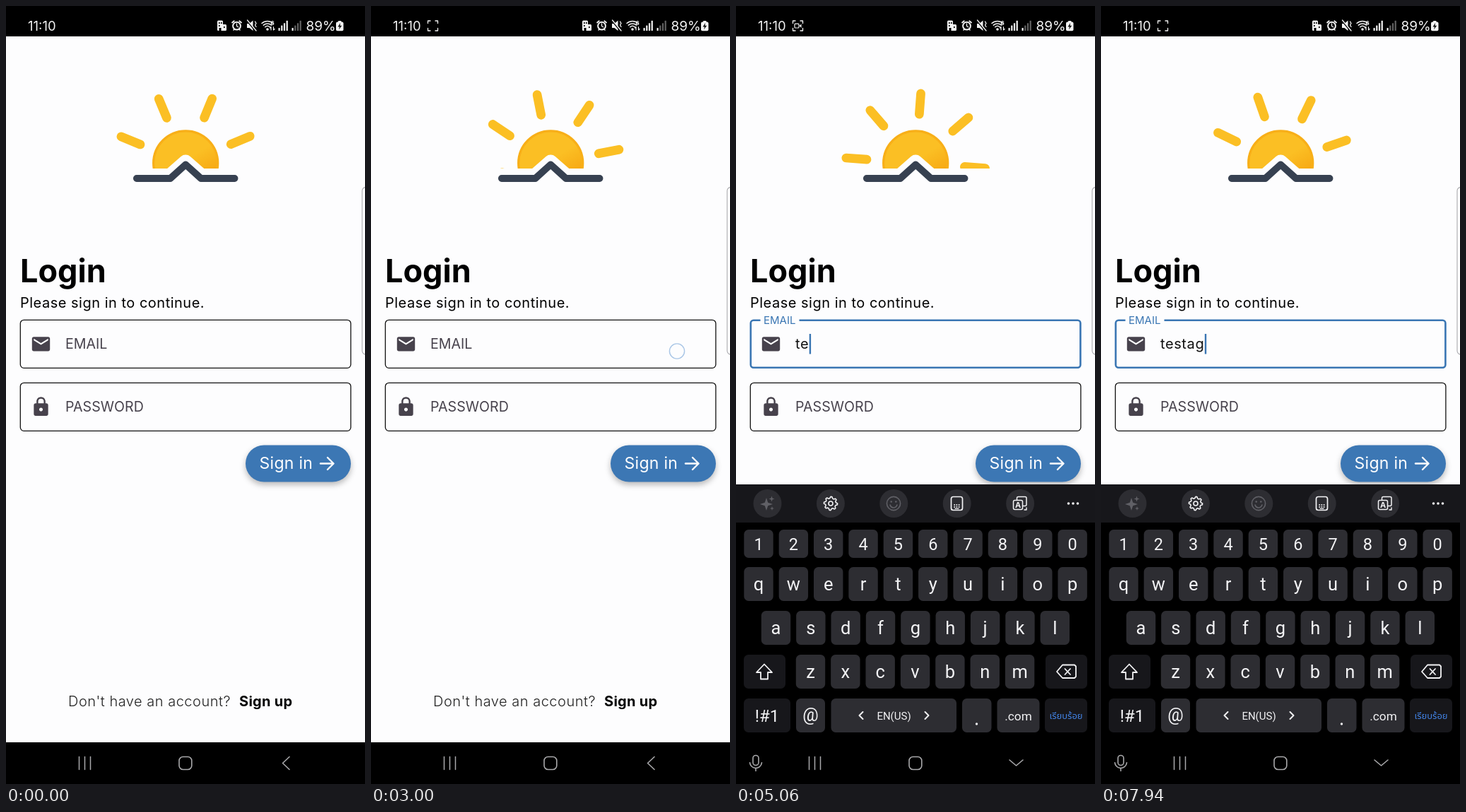
Recreate the animation shown at these times as an HTML page with a canvas. Size 508 by 1101 pixels, loop 8 s.

```html
<!DOCTYPE html>
<html lang="en">
<head>
<meta charset="utf-8">
<title>Login screen</title>
<style>
html, body { margin: 0; width: 100%; height: 100%; overflow: hidden; background: #000; }
canvas { display: block; width: 508px; height: 1101px; }
</style>
</head>
<body>
<canvas id="stage"></canvas>
<script>
const W = 508, H = 1101, LOOP = 8000, TAU = Math.PI * 2;
const canvas = document.getElementById('stage');
const c = canvas.getContext('2d');
const dpr = window.devicePixelRatio || 1;
canvas.width = W * dpr;
canvas.height = H * dpr;

const UI = 'Inter, "Open Sans", sans-serif';
const KEYS = 'Roboto, "Noto Sans", sans-serif';
const PAPER = '#fdfdfe', INK = '#47424c', BLUE = '#3a76b3', KEY = '#2d2d32', DARK = '#17171b';

const clamp = v => Math.max(0, Math.min(1, v));
const ramp = (t, start, length) => clamp((t - start) / length);
const easeOut = p => 1 - (1 - p) ** 3;

const PUSH = 290, POP = 2060, ZOOM = 300, FOCUS = 3180, KEYBOARD = 3310;
const typed = [[4350, 't'], [4900, 'e'], [5350, 's'], [5750, 't'], [7050, 'a'], [7600, 'g']];
const rows = [['1234567890', 32, 741, 40], ['qwertyuiop', 32, 794, 48],
              ['asdfghjkl', 56.5, 856, 48], ['zxcvbnm', 105.5, 918, 48]];
const STEP = 49.35;

const mail = new Path2D('M20 4H4c-1.1 0-2 .9-2 2v12c0 1.1.9 2 2 2h16c1.1 0 2-.9 2-2V6c0-1.1-.9-2-2-2zm0 4l-8 5-8-5V6l8 5 8-5v2z');
const lock = new Path2D('M18 8h-1V6c0-2.76-2.24-5-5-5S7 3.24 7 6v2H6c-1.1 0-2 .9-2 2v10c0 1.1.9 2 2 2h12c1.1 0 2-.9 2-2V10c0-1.1-.9-2-2-2zm-6 9c-1.1 0-2-.9-2-2s.9-2 2-2 2 .9 2 2-.9 2-2 2zm3.1-9H8.9V6a3.1 3.1 0 0 1 6.2 0z');
const person = new Path2D('M12 12a4 4 0 1 0 0-8 4 4 0 0 0 0 8zm0 2c-2.67 0-8 1.34-8 4v2h16v-2c0-2.66-5.33-4-8-4z');
const sunClip = new Path2D('M512 306H304l-35.9-31.4a18.4 18.4 0 0 0-24.3 0L208 306H0V0h512z');

function text(str, x, y, size, color, opt = {}) {
  c.font = `${opt.weight || 400} ${size}px ${opt.family || UI}`;
  c.letterSpacing = (opt.gap || 0) + 'px';
  c.textAlign = opt.align || 'left';
  c.fillStyle = color;
  c.fillText(str, x, y);
}

function fillBox(x, y, w, h, r, color) {
  c.beginPath();
  c.roundRect(x, y, w, h, r);
  c.fillStyle = color;
  c.fill();
}

function strokeBox(x, y, w, h, r, color, width) {
  c.beginPath();
  c.roundRect(x, y, w, h, r);
  c.strokeStyle = color;
  c.lineWidth = width;
  c.stroke();
}

function line(points, color, width, close) {
  c.beginPath();
  points.forEach(([x, y], i) => i ? c.lineTo(x, y) : c.moveTo(x, y));
  if (close) c.closePath();
  c.strokeStyle = color;
  c.lineWidth = width;
  c.lineCap = c.lineJoin = 'round';
  c.stroke();
}

function circle(x, y, r, fill, stroke, width) {
  c.beginPath();
  c.arc(x, y, r, 0, TAU);
  if (fill) { c.fillStyle = fill; c.fill(); }
  if (stroke) { c.strokeStyle = stroke; c.lineWidth = width; c.stroke(); }
}

function poly(points, color) {
  c.beginPath();
  points.forEach(([x, y]) => c.lineTo(x, y));
  c.fillStyle = color;
  c.fill();
}

function glyph(path, x, y) {
  c.save();
  c.translate(x, y);
  c.scale(1.27, 1.27);
  c.translate(-12, -12);
  c.fillStyle = INK;
  c.fill(path, 'evenodd');
  c.restore();
}

function gradient(x0, y0, x1, y1, from, to) {
  const g = c.createLinearGradient(x0, y0, x1, y1);
  g.addColorStop(0, from);
  g.addColorStop(0.45, from);
  g.addColorStop(1, to);
  return g;
}

function horizon(dy) {
  line([[128, 332], [216, 332], [256, 332 + dy], [296, 332], [384, 332]], '#374151', 18);
}

function iconSpace() {
  c.translate(254.2, 244);
  c.scale(0.542, 0.542);
  c.translate(-256, -332);
}

function sun(angle) {
  c.save();
  iconSpace();
  c.save();
  c.clip(sunClip);
  const fill = gradient(214, 219, 298, 365, '#fbbf24', '#f59e0b');
  circle(256, 292, 84, fill, '#f8af18', 6);
  c.restore();
  c.save();
  c.beginPath();
  c.rect(0, 0, 512, 306);
  c.clip();
  c.translate(256, 292);
  c.rotate(angle * TAU / 360);
  for (let i = 0; i < 8; i++) {
    line([[0, -128], [0, -182]], '#fbbf24', 23.5);
    c.rotate(TAU / 8);
  }
  c.restore();
  horizon(-36);
  c.restore();
}

function moon(angle) {
  c.save();
  c.beginPath();
  [[0, 0], [W, 0], [W, 230], [271.5, 230], [257, 243], [254.5, 244.5], [252, 243], [237, 230], [0, 230]]
    .forEach(([x, y]) => c.lineTo(x, y));
  c.clip();
  c.translate(255, 205.5);
  c.rotate(angle * TAU / 360);
  const R = 74, r = 72, ix = 45.5, iy = -74;
  const d = Math.hypot(ix, iy), dir = Math.atan2(iy, ix);
  const a = Math.acos((R * R - r * r + d * d) / (2 * R * d));
  const b = Math.acos((r * r - R * R + d * d) / (2 * r * d));
  c.beginPath();
  c.arc(0, 0, R, dir + a, dir - a + TAU);
  c.arc(ix, iy, r, dir + Math.PI + b, dir + Math.PI - b, true);
  c.closePath();
  c.fillStyle = gradient(-40, -50, 38, 70, '#86c3db', '#5eafcf');
  c.fill();
  c.strokeStyle = '#72b9d5';
  c.lineWidth = 3;
  c.lineJoin = 'round';
  c.stroke();
  c.restore();
  c.save();
  iconSpace();
  horizon(36);
  c.restore();
}

function field(y, icon, label, focus = 0) {
  if (focus) strokeBox(20.8, y + 0.8, 466.6, 67, 4, BLUE, 2.6);
  else strokeBox(20.3, y + 0.3, 467.6, 68, 5, '#111', 1.3);
  glyph(icon, 49.5, y + 34.3);
  if (focus) {
    c.fillStyle = PAPER;
    c.fillRect(62 - 27.5 * focus, y - 3, 55 * focus, 8);
  }
  text(label, 84 - 45 * focus, y + 41 - 35 * focus, 19.6 - 4.6 * focus, focus ? BLUE : INK,
       { gap: label === label.toUpperCase() ? 0 : 0.4 });
}

function button(x, y, label) {
  c.save();
  c.shadowColor = 'rgba(0,0,0,.28)';
  c.shadowBlur = 9 * dpr;
  c.shadowOffsetY = 4 * dpr;
  fillBox(x, y, 488 - x, 52, 26, '#3c77b4');
  c.restore();
  text(label, x + 19.5, y + 33.5, 23, '#fff', { gap: 0.3 });
  const m = y + 26;
  line([[445, m], [463, m]], '#fff', 2.4);
  line([[455, m - 8.5], [463.5, m], [455, m + 8.5]], '#fff', 2.4);
}

function footer(question, qx, action, ax) {
  text(question, qx, 991, 20, '#222', { weight: 300, gap: 0.5 });
  text(action, ax, 991, 20, '#000', { weight: 700, gap: 0.3 });
}

function title(str) {
  text(str, 20, 391, 45, '#000', { weight: 700 });
}

function login(t) {
  const angle = t < POP ? -22.7 + 7.5 * Math.min(t, PUSH + ZOOM) / 1000 : -33.7 + 7.5 * t / 1000;
  sun(angle);
  title('Login');
  text('Please sign in to continue.', 20, 427, 20, '#000', { gap: 0.5 });
  field(444, mail, 'EMAIL', easeOut(ramp(t, FOCUS, 167)));
  field(533, lock, 'PASSWORD');
  button(339, 621.5, 'Sign in');
  footer("Don't have an account?", 88, 'Sign up', 330);
  if (t < FOCUS) return;

  const done = typed.filter(k => k[0] <= t);
  const word = done.map(k => k[1]).join('');
  text(word, 84, 485, 20, '#111', { gap: 0.6 });
  const since = t - (done.length ? done[done.length - 1][0] : FOCUS);
  if (since % 1000 < 500) {
    c.fillStyle = BLUE;
    c.fillRect(84.5 + c.measureText(word).width, 464, 2.4, 28.5);
  }
}

function signup(t) {
  moon(6 * (t - 690) / 1000);
  title('Create Account');
  [[person, 'Full Name'], [mail, 'Email'], [lock, 'Password'], [lock, 'Confirm Password']]
    .forEach(([icon, label], i) => field(416 + 88.8 * i, icon, label));
  button(330, 771, 'Sign up');
  footer('Already have a accont?', 92, 'Sign in', 334);
}

function page(draw, t, alpha, scale) {
  c.save();
  c.beginPath();
  c.rect(0, 43, W, 999);
  c.clip();
  c.globalAlpha = alpha;
  c.translate(W / 2, 542);
  c.scale(scale, scale);
  c.translate(-W / 2, -542);
  c.fillStyle = PAPER;
  c.fillRect(0, 43, W, 999);
  draw(t);
  c.restore();
}

function statusBar(t, tint) {
  c.fillStyle = '#000';
  c.fillRect(0, 0, W, 43);
  c.globalAlpha = tint;
  c.fillStyle = '#abb9b5';
  c.fillRect(0, 19, W, 24);
  c.fillStyle = '#5d706b';
  c.fillRect(0, 0, W, 19);
  c.globalAlpha = 1;

  const w = '#f4f4f4', back = tint > 0.5 ? '#abb9b5' : '#000';
  text('11:10', 31, 35, 18.5, w);
  if (t >= 60) {
    for (const [sx, sy] of [[-1, -1], [1, -1], [1, 1], [-1, 1]]) {
      const x = 87.5 + 7 * sx, y = 28 + 7 * sy;
      line([[x - 3.5 * sx, y], [x, y], [x, y - 3.5 * sy]], w, 1.3);
    }
    const phase = t % 1000;
    if (phase >= 30 && phase < 500) {
      strokeBox(83, 25.2, 6, 5.8, 1, w, 1.2);
      poly([[89.5, 28], [92.5, 25.5], [92.5, 31]], w);
    }
  }
  // building
  fillBox(299, 20.5, 8, 14.5, 1.5, w);
  fillBox(304, 26, 8, 9, 1.5, w);
  for (const [x, y] of [[301, 23], [304, 23], [301, 27], [308, 29]]) {
    c.fillStyle = back;
    c.fillRect(x, y, 1.6, 2);
  }
  c.fillRect(301.5, 31, 3, 4);
  // alarm
  circle(326.5, 28.2, 5.4, null, w, 2);
  line([[326.5, 25], [326.5, 28.5], [328.6, 29.8]], w, 1.3);
  line([[320, 23.5], [322.7, 21.2]], w, 1.8);
  line([[333, 23.5], [330.3, 21.2]], w, 1.8);
  line([[322, 34], [323, 33]], w, 1.6);
  line([[331, 34], [330, 33]], w, 1.6);
  // mute
  poly([[341, 25], [344.5, 25], [349.5, 20.5], [349.5, 35], [344.5, 31], [341, 31]], w);
  line([[341, 20.5], [353, 35]], back, 2.4);
  line([[341.5, 20], [354, 35]], w, 1.3);
  line([[352.5, 22], [354, 24.5], [352.5, 27], [354, 29.5]], w, 1.3);
  // wifi
  for (const r of [5, 8.5, 12]) {
    c.beginPath();
    c.arc(370, 33.5, r, -2.3, -0.85);
    c.strokeStyle = w;
    c.lineWidth = 1.5;
    c.stroke();
  }
  circle(370, 33, 1.8, w);
  text('6', 374.5, 27, 8, w, { weight: 700 });
  line([[375, 34], [375, 29.5], [373.5, 31]], w, 1.2);
  line([[378.5, 29.5], [378.5, 34], [380, 32.5]], w, 1.2);
  // signal bars
  for (let i = 0; i < 4; i++) {
    const h = 4 + 3.4 * i;
    fillBox(385.5 + 3.7 * i, 35 - h, 2.2, h, 0.5, w);
    fillBox(404.5 + 3.7 * i, 35 - h, 2.2, h, 0.5, i ? 'rgba(255,255,255,.38)' : w);
  }
  text('89%', 424.5, 35, 19, w);
  fillBox(467, 22.5, 10.5, 12.8, 2, w);
  fillBox(470, 21, 4.5, 3, 0.8, w);
  poly([[473.2, 23.8], [469.5, 29.4], [472, 29.4], [471, 33.6], [475.2, 27.8], [472.6, 27.8]], '#111');
}

function navBar(open) {
  c.fillStyle = '#000';
  c.fillRect(0, 1042, W, 59);
  const g = '#a9a9ab';
  for (const x of [103.5, 111.5, 119.5]) line([[x, 1062.5], [x, 1080.5]], g, 1.5);
  strokeBox(245, 1062.5, 17.8, 18, 5.5, g, 1.6);
  if (!open) return line([[401, 1062.5], [391.5, 1071.5], [401, 1080.5]], g, 1.6);
  line([[387, 1067], [396.5, 1075], [406, 1067]], g, 1.6);
  strokeBox(24, 1060.5, 8, 14, 4, g, 1.6);
  c.beginPath();
  c.arc(28, 1070, 8.5, 0.1, Math.PI - 0.1);
  c.stroke();
  line([[28, 1078.5], [28, 1082.5]], g, 1.6);
}

function toolbar() {
  const y = 704, w = '#f3f3f5', dim = '#606066';
  fillBox(0, 677, W, 54, 0, DARK);
  for (let i = 0; i < 5; i++) circle(44.5 + 89.4 * i, y, 20, KEY);
  // sparkles
  for (const [x, sy, r] of [[43, y + 1, 9], [50.5, y - 6.5, 4], [51, y + 7, 3]]) {
    const pts = [];
    for (let i = 0; i < 8; i++) {
      const a = i * TAU / 8, q = i % 2 ? r * 0.35 : r;
      pts.push([x + q * Math.cos(a), sy + q * Math.sin(a)]);
    }
    poly(pts, dim);
  }
  // gear
  const teeth = [];
  for (let i = 0; i < 32; i++) {
    const a = i * TAU / 32, q = i % 4 < 2 ? 9.6 : 7.4;
    teeth.push([134 + q * Math.cos(a), y + q * Math.sin(a)]);
  }
  line(teeth, w, 1.6, true);
  circle(134, y, 3, null, w, 1.6);
  // smiley
  circle(223, y, 9.6, null, dim, 1.6);
  circle(219.7, y - 2.5, 1.3, dim);
  circle(226.3, y - 2.5, 1.3, dim);
  c.beginPath();
  c.arc(223, y + 1, 5, 0.2, Math.PI - 0.2);
  c.stroke();
  // keypad
  strokeBox(304.5, y - 9.5, 16, 19, 3, w, 1.7);
  for (let i = 0; i < 6; i++) circle(309.2 + 3.2 * (i % 3), y + 2 + 3 * (i / 3 | 0), 1, w);
  line([[310, y + 7.3], [315, y + 7.3]], w, 1.2);
  // translate
  strokeBox(397.5, y - 9.5, 13.5, 13, 2, w, 1.5);
  fillBox(392, y - 5, 14, 14, 2, KEY);
  strokeBox(392.5, y - 4.5, 13, 13, 2, w, 1.5);
  text('A', 399, y + 6, 11, w, { weight: 700, align: 'center' });
  line([[411, y + 6], [411, y + 9], [408, y + 9]], w, 1.4);
  for (const x of [470.5, 477, 483.5]) circle(x, y, 1.8, w);
}

function keyboard(dy) {
  const w = '#f3f3f5', mid = { family: KEYS, align: 'center' };
  c.save();
  c.beginPath();
  c.rect(0, 43, W, 999);
  c.clip();
  c.translate(0, dy);
  c.fillStyle = '#000';
  c.fillRect(0, 677, W, 424);
  toolbar();
  rows.forEach(([chars, x0, y, h], r) => [...chars].forEach((ch, i) => {
    const x = x0 + STEP * i;
    fillBox(x - 20.7, y, 41.4, h, 6.5, KEY);
    text(ch, x, y + (r ? 33 : 28.5), r ? 25.5 : 23.5, w, mid);
  }));
  // shift and backspace
  fillBox(11, 918, 59, 48, 6.5, DARK);
  fillBox(438, 918, 59, 48, 6.5, DARK);
  line([[40, 931.5], [51, 943], [45, 943], [45, 952.5], [35, 952.5], [35, 943], [29, 943]], w, 1.8, true);
  line([[462, 932.5], [479, 932.5], [481, 934.5], [481, 949], [479, 951], [462, 951], [454, 942]], w, 1.8, true);
  line([[465.5, 938], [473, 946]], w, 1.8);
  line([[473, 938], [465.5, 946]], w, 1.8);
  // bottom row
  [[11, 66, DARK], [85, 41, KEY], [134.5, 177.5, KEY], [320, 41.5, KEY], [369.5, 60, KEY], [437, 60, DARK]]
    .forEach(([x, wd, color]) => fillBox(x, 980, wd, 48, 6.5, color));
  text('!#1', 44, 1013, 24, w, mid);
  text('@', 105.5, 1012, 25, w, mid);
  text('EN(US)', 223.5, 1009.5, 15, w, mid);
  line([[179.5, 999], [174.5, 1004], [179.5, 1009]], w, 2);
  line([[267.5, 999], [272.5, 1004], [267.5, 1009]], w, 2);
  circle(340.5, 1016, 1.7, w);
  text('.com', 399.5, 1010.5, 17.2, w, mid);
  text('เรียบร้อย', 467, 1009, 13, '#4283e6', { family: '"Noto Sans Thai", "Noto Sans", sans-serif', align: 'center' });
  c.restore();
}

function keySpot(ch) {
  for (const [chars, x, y, h] of rows) {
    const i = chars.indexOf(ch);
    if (i >= 0) return [x + STEP * i, y + h / 2];
  }
}

const taps = [[80, 367, 984], [1760, 368, 984], [2880, 433, 488.5],
  ...typed.map(([at, ch]) => [at - 100, ...keySpot(ch)])];

function touches(t) {
  for (const [at, x, y] of taps) {
    const length = at > FOCUS ? 110 : 240;
    if (t >= at && t < at + length) circle(x, y, 10.6, null, '#a9c6e6', 1.4);
  }
}

function render(t) {
  c.setTransform(dpr, 0, 0, dpr, 0, 0);
  c.fillStyle = '#000';
  c.fillRect(0, 0, W, H);
  const p = t < POP ? easeOut(ramp(t, PUSH, ZOOM)) : 1 - easeOut(ramp(t, POP, ZOOM));
  if (p < 1) page(login, t, 1, 1 + 0.05 * p);
  if (p > 0) page(signup, t, clamp(p * 1.4), 0.85 + 0.15 * p);

  // edge handle
  c.save();
  c.beginPath();
  c.rect(0, 43, W, 999);
  c.clip();
  fillBox(504, 256.5, 12, 236.5, 5, PAPER);
  strokeBox(504, 256.5, 12, 236.5, 5, '#a8a8ac', 1.1);
  c.restore();

  const open = t >= KEYBOARD;
  if (open) keyboard(365 * (1 - easeOut(ramp(t, KEYBOARD, 475))));
  statusBar(t, p);
  navBar(open);
  touches(t);
}

function tick() {
  render(performance.now() % LOOP);
  requestAnimationFrame(tick);
}
tick();
</script>
</body>
</html>
```
